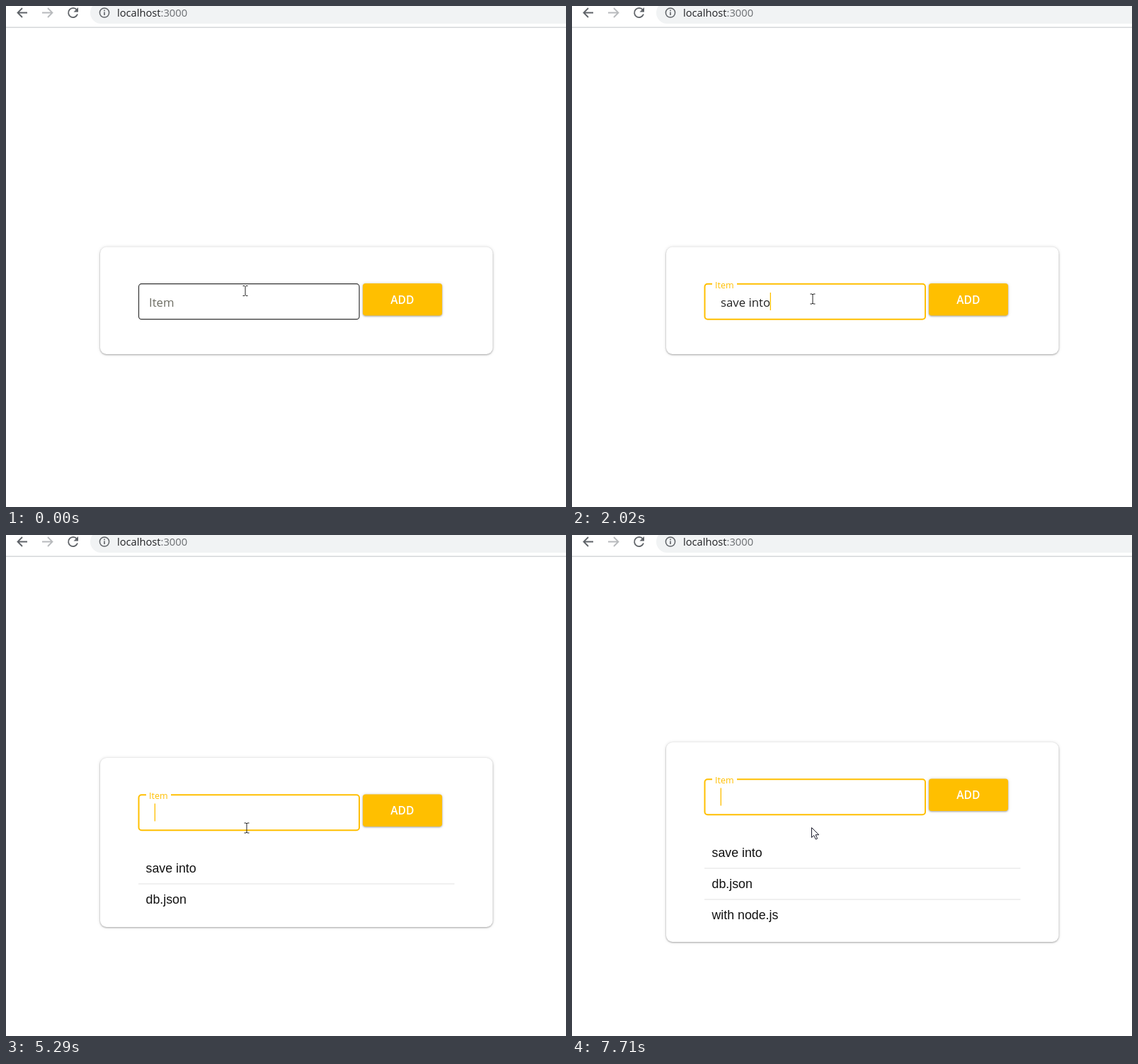
Animation of 791x708 px, one loop 8000 ms. Source, as an HTML page:

```html
<!DOCTYPE html>
<html lang="en">
<head>
<meta charset="utf-8">
<title>Item list</title>
<style>
  html, body { margin: 0; width: 100%; height: 100%; overflow: hidden; background: #fff; }
  svg { display: block; width: 791px; height: 708px; }
  text { font-family: "Open Sans", "Noto Sans", sans-serif; white-space: pre; }
  .icon { fill: none; stroke: #5f6368; stroke-width: 1.8; }
  .raised { filter: drop-shadow(0 1px 1px rgba(0,0,0,.3)) drop-shadow(0 0 2px rgba(0,0,0,.14)); }
  .typed { font-size: 16.75px; fill: #222; }
  .row text { font: 17.8px "Liberation Sans", Arial, sans-serif; fill: #111; }
</style>
</head>
<body>
<svg viewBox="0 0 791 708">
  <!-- browser bar -->
  <rect x="119" y="-6" width="720" height="31" rx="15.5" fill="#f1f3f4"/>
  <rect y="29.5" width="791" height="1.5" fill="#d5d7da"/>
  <path class="icon" d="M30 9.5H17M23 3L16.500 9.500L23 16"/>
  <path class="icon" style="stroke:#b8babd" d="M51 9.500H65M59 3L65.500 9.500L59 16"/>
  <path class="icon" d="M100 5.500A6.600 6.600 0 1 0 101 11.500"/>
  <path fill="#5f6368" d="M102 2V8.500H95.500Z"/>
  <circle class="icon" cx="139" cy="9.5" r="6.6" style="stroke-width:1.5"/>
  <path class="icon" style="stroke-width:1.6" d="M139 8.500V13M139 5.500V7.200"/>
  <text x="157" y="15" font-size="14.7" fill="#202124">localhost<tspan fill="#6a6d71">:3000</tspan></text>

  <g id="card">
    <rect id="panel" class="raised" x="133" width="554.5" height="151.5" rx="9" fill="#fff"/>
    <rect id="field" x="187.5" y="52.2" width="311.5" height="50" rx="4" fill="#fff"/>
    <rect id="notch" x="198" y="50" height="5" fill="#fff"/>
    <text id="label">Item</text>
    <text id="typed" class="typed" x="210" y="84"></text>
    <rect id="caret" y="64.5" width="1.3" height="25" fill="#ffbf00"/>
    <rect class="raised" x="504" y="51.500" width="112" height="45.500" rx="4" fill="#ffbf00"/>
    <text x="559.8" y="80" font-size="15.5" font-weight="600" text-anchor="middle" fill="#fff">ADD</text>
    <g id="rows"></g>
  </g>

  <g id="hint">
    <rect class="raised" x="186" y="442.5" width="313" height="59" rx="4" fill="#fff"/>
    <text x="199" y="476.5" font-size="13.8" font-weight="500" fill="#1c1f2b">save</text>
  </g>

  <path id="beam" fill="none" stroke="#222" d="M-3.500 -6.500H-1L0 -5.500L1 -6.500H3.500M0 -5.500V6.500M-3.500 7.500H-1L0 6.500L1 7.500H3.500"/>
  <path id="arrow" fill="#fff" stroke="#1c1c2c" d="M338.500 413.500V427.500L341.700 424.500L344.300 430L346.600 429L344.100 423.700H348.700Z"/>
</svg>
<script>
const LOOP = 8000;
const $ = id => document.getElementById(id);
const set = (el, attrs) => { for (const k in attrs) el.setAttribute(k, attrs[k]); };
const show = (el, on) => set(el, { visibility: on ? "visible" : "hidden" });
const clamp = v => Math.min(1, Math.max(0, v));
const mix = (a, b, p) => a + (b - a) * p;

const FOCUS = 310;
const typing = [
  [0, ""], [780, "s"], [860, "sa"], [1010, "sav"], [1170, "save"], [1340, "save "],
  [1510, "save i"], [1680, "save in"], [1850, "save int"], [2020, "save into"], [2560, ""],
  [3430, "d"], [3490, "db"], [4200, "db."], [4360, "db.j"], [4520, "db.js"],
  [4670, "db.jso"], [4830, "db.json"], [5290, ""],
  [5930, "w"], [6070, "wi"], [6200, "with"], [6340, "with "], [6470, "with n"],
  [6710, "with nod"], [6860, "with node"], [7250, "with node."], [7330, "with node.j"],
  [7410, "with node.js"], [7710, ""]
];
const blinks = [[3030, 3430], [4040, 4200], [5780, 5930]];
const items = [[2560, "save into"], [5290, "db.json"], [7710, "with node.js"]];
const tops = [340.5, 337, 315, 293];
const heights = [151.5, 194.5, 239, 282];

$("rows").innerHTML = items.map(([, text], i) => `<g class="row">
  ${i ? `<rect x="187" y="${133.5 + 44 * i}" width="446.5" height="1" fill="#e2e2e2"/>` : ""}
  <text x="197.5" y="${161.5 + 44 * i}">${text}</text></g>`).join("");
const rows = [...document.querySelectorAll(".row")];

function draw(t) {
  const count = items.filter(([at]) => t >= at).length;
  set($("card"), { transform: `translate(0 ${tops[count]})` });
  set($("panel"), { height: heights[count] });
  rows.forEach((row, i) => show(row, i < count));

  const focused = t >= FOCUS;
  const p = 1 - (1 - clamp((t - FOCUS) / 170)) ** 3;
  set($("field"), { stroke: focused ? "#ffbf00" : "#333", "stroke-width": focused ? 2 : 1.2 });
  set($("notch"), { width: 35 * p });
  set($("label"), {
    x: 202, y: mix(84.5, 58, p), "font-size": mix(16.75, 12.5, p),
    fill: focused ? "#ffbf00" : "#6e6e64"
  });

  const text = typing.filter(([at]) => t >= at).pop()[1];
  $("typed").textContent = text;
  set($("caret"), { x: 209.7 + (text ? $("typed").getComputedTextLength() : 0) });
  show($("caret"), focused && !blinks.some(([a, b]) => t >= a && t < b));
  show($("hint"), t >= 780 && t < 1170);

  const m = clamp((t - 70) / 160);
  set($("beam"), { transform: `translate(${mix(338, 340, m)} ${mix(402, 413.5, m)})` });
  show($("beam"), count < 3);
  show($("arrow"), count === 3);
}

const start = performance.now();
function tick() {
  draw((performance.now() - start) % LOOP);
  requestAnimationFrame(tick);
}
tick();
</script>
</body>
</html>
```
